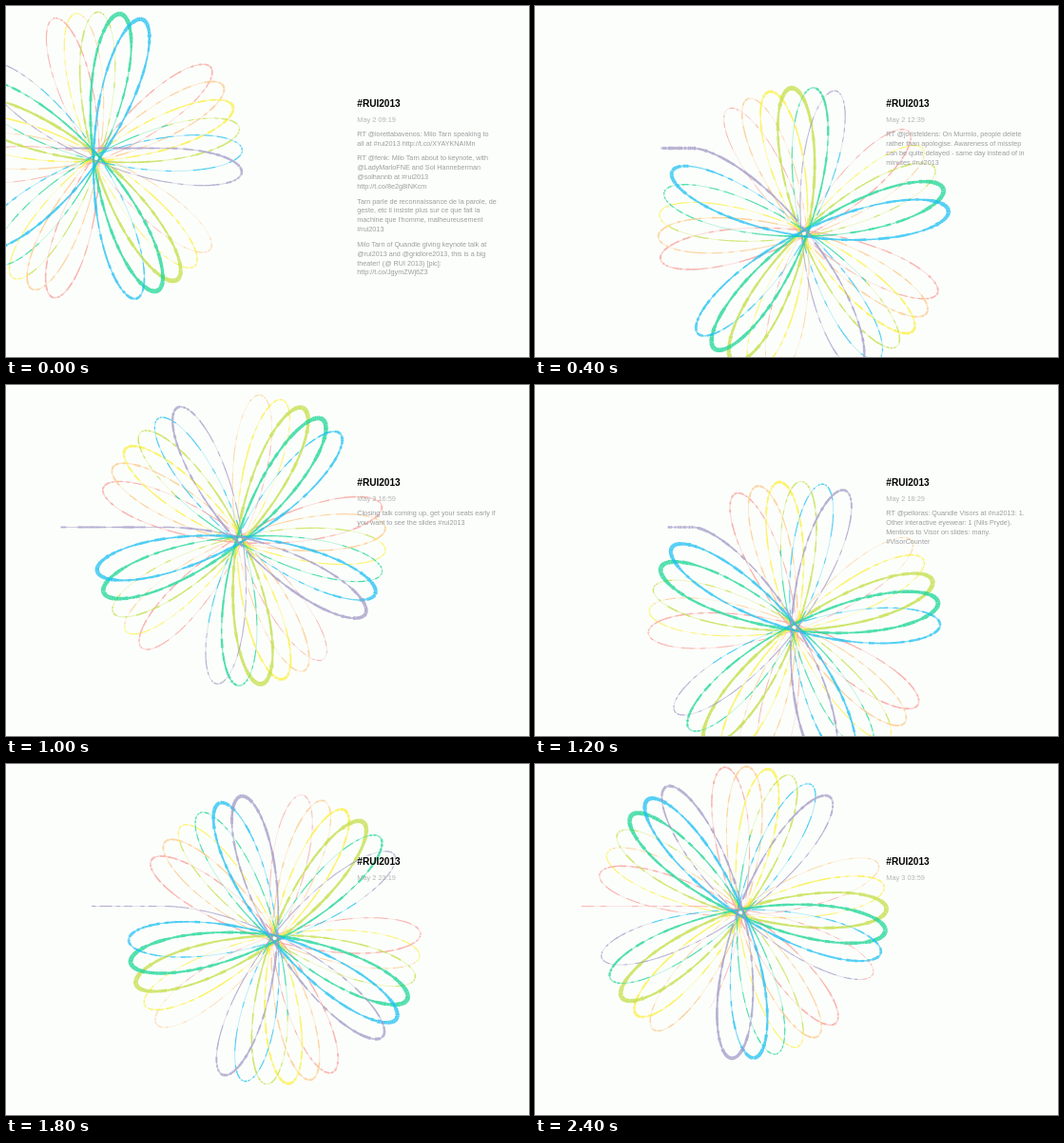
These frames come from a looping animation (550 by 369 pixels, 2600 ms). An HTML page with a canvas:

```html
<!DOCTYPE html>
<html lang="en">
<head>
<meta charset="utf-8">
<title>Tweet rose</title>
<style>
  html, body { margin: 0; width: 100%; height: 100%; overflow: hidden; background: #fcfefb; }
  canvas, svg { position: absolute; left: 0; top: 0; width: 550px; height: 369px; }
  text { font-family: "Liberation Sans", Arial, sans-serif; font-size: 7.22px; fill: #9c9c9f; }
  #title { font-size: 10.08px; font-weight: bold; fill: #000; }
  #date { font-size: 7.4px; fill: #b6b6b6; }
</style>
</head>
<body>
<canvas id="stage"></canvas>
<svg viewBox="0 0 550 369">
  <text id="title" x="369.3" y="105.8">#RUI2013</text>
  <text id="date" x="369.3" y="122.4"></text>
  <g id="tweets"></g>
</svg>
<script>
const W = 550, H = 369, STEP = 200;
const PEN = { x: 165.5, y: 149.5 };
const R = 153.5, HOLE = 3, TURN = 0.1902; // petal length, centre hole, precession
const RATE = 0.5243;                      // degrees of path per minute
const START = { deg: 27.6, minute: 559 }; // path angle and minute of May 2 at the first step
const WEEK = 7 * 1440 * RATE, LEAD = 46, CELL = 5 * RATE;
const OLDEST = START.deg + (START.minute + 6 * 1440) * RATE;

// one colour per weekday, one activity level per day, counted back from May 3
const COLORS = ["#f79d97", "#a298c6", "#1cbff2", "#1ad596", "#c2de45", "#fcee3a", "#fcc787"];
const LEVELS = [0.28, 0.72, 0.88, 1, 0.98, 0.5, 0.32, 0.3];

// pen angle, date and tweets of each step
const STEPS = [
  [27.6, "May 2 09:19", [
    ["RT @lorettabavenos: Milo Tarn speaking to", "all at #rui2013 http://t.co/XYAYKNAIMn"],
    ["RT @fenk: Milo Tarn about to keynote, with", "@LadyMarloFNE and Sol Hanneberman",
     "@solhannb at #rui2013", "http://t.co/8e2g8iNKcm"],
    ["Tarn parle de reconnaissance de la parole, de", "geste, etc il insiste plus sur ce que fait la",
     "machine que l'homme, malheureusement", "#rui2013"],
    ["Milo Tarn of Quandle giving keynote talk at", "@rui2013 and @gridlore2013, this is a big",
     "theater! (@ RUI 2013) [pic]:", "http://t.co/JgymZWj6Z3"]]],
  [-27, "May 2 10:59", [
    ["Full room again this morning, the session on", "everyday sharing is starting now #rui2013"]]],
  [-74.5, "May 2 12:39", [
    ["RT @jorisfeldens: On Murmlo, people delete", "rather than apologise. Awareness of misstep",
     "can be quite delayed - same day instead of in", "minutes #rui2013"]]],
  [-118, "May 2 13:59", [
    ["Lunch is over, on to the afternoon papers and", "the last demos of the week #rui2013"]]],
  [-160.6, "May 2 15:19", [
    ["@IlonaMarrek @TeoBastin Let us know if you", "have any thoughts on our Murmlo regret paper:",
     "http://t.co/zva9hEJdyE #rui2013"]]],
  [-212, "May 2 16:59", [
    ["Closing talk coming up, get your seats early if", "you want to see the slides #rui2013"]]],
  [-257.9, "May 2 18:29", [
    ["RT @pelloras: Quandle Visors at #rui2013: 1.", "Other interactive eyewear: 1 (Nils Pryde).",
     "Mentions to Visor on slides: many.", "#VisorCounter"]]],
  [-306, "May 2 19:59", []],
  [-354.5, "May 2 21:29", []],
  [-412.5, "May 2 23:19", []],
  [-461, "May 3 00:49", [
    ["Back home after a long week, thanks to all", "the volunteers #rui2013"]]],
  [-510, "May 3 02:19", [
    ["Still reading the papers that I missed, many", "good ones this year #rui2013"]]],
  [-559.4, "May 3 03:59", []]
];

const clamp = v => Math.max(0, Math.min(1, v));
const mix = (a, b, t) => a + (b - a) * t;
const noise = n => { const v = Math.sin(n * 12.9898) * 43758.5453; return v - Math.floor(v); };

const canvas = document.getElementById("stage");
const ctx = canvas.getContext("2d");
const ratio = window.devicePixelRatio || 1;
canvas.width = W * ratio;
canvas.height = H * ratio;

function turn(x, y, a) {
  const c = Math.cos(a), s = Math.sin(a);
  return [x * c - y * s, x * s + y * c];
}

const rose = a => turn(R * Math.sin(a), -HOLE * Math.cos(a), TURN * a);

const slope = a => turn((R + TURN * HOLE) * Math.cos(a), (HOLE + TURN * R) * Math.sin(a), TURN * a);

// The path always leaves the pen to the right; newer data waits on a straight line behind it.
function makePath(penDeg) {
  const a0 = penDeg * RAD, z0 = rose(a0), v = slope(a0);
  const stretch = R * Math.abs(Math.cos(a0)), tilt = -Math.atan2(v[1], v[0]);
  return deg => {
    const a = deg * RAD;
    if (a < a0) return [PEN.x + stretch * (a - a0), PEN.y];
    const z = rose(a), p = turn(z[0] - z0[0], z[1] - z0[1], tilt);
    return [PEN.x + p[0], PEN.y + p[1]];
  };
}
const RAD = Math.PI / 180;

const minuteAt = deg => START.minute + (START.deg - deg) / RATE;

function activity(minute, day) {
  const h = (minute - Math.floor(minute / 1440) * 1440) / 60;
  return LEVELS[day] * mix(0.16, 1, clamp((h - 5.5) / 3.5) * clamp((22 - h) / 4.5));
}

function drawRose(penDeg) {
  const at = makePath(penDeg);
  ctx.setTransform(ratio, 0, 0, ratio, 0, 0);
  ctx.fillStyle = "#fcfefb";
  ctx.fillRect(0, 0, W, H);
  const first = Math.floor((penDeg - LEAD) / CELL);
  const last = Math.floor(Math.min(penDeg + WEEK, OLDEST) / CELL) - 1;
  for (let i = last; i >= first; i--) {
    const deg = i * CELL, held = Math.max(deg, penDeg);
    const day = 1 - Math.floor(minuteAt(held) / 1440);
    const act = activity(minuteAt(deg), day);
    const tip = Math.pow(Math.sin(held * RAD), 8);
    const busy = noise(i) < 0.45 + act * (deg < penDeg ? 0.3 : 0.6);
    const bulge = mix(0.35 + 1.1 * noise(i + 7000), 0.95, tip);
    ctx.strokeStyle = COLORS[day];
    ctx.lineWidth = busy ? 0.9 + act * (1.6 + 2.6 * tip) * bulge : 0.5 + act * (0.5 + 2.5 * tip);
    ctx.globalAlpha = busy ? 0.78 : 0.45 + 0.3 * act;
    ctx.beginPath();
    for (let k = 0; k <= 4; k++) ctx.lineTo(...at(deg + CELL * k / 4));
    ctx.stroke();
  }
  ctx.globalAlpha = 1;
}

function drawText(date, tweets) {
  document.getElementById("date").textContent = date;
  const box = document.getElementById("tweets");
  box.replaceChildren();
  let y = 137.2;
  for (const lines of tweets) {
    for (const line of lines) {
      const el = document.createElementNS("http://www.w3.org/2000/svg", "text");
      el.setAttribute("x", 369.3);
      el.setAttribute("y", y);
      el.textContent = line;
      box.append(el);
      y += 9.95;
    }
    y += 5.3;
  }
}

let shown = -1;
function render(now) {
  const index = Math.floor(now % (STEP * STEPS.length) / STEP);
  if (index === shown) return;
  shown = index;
  const [deg, date, tweets] = STEPS[index];
  drawRose(deg);
  drawText(date, tweets);
}

// the oldest day shares the first colour
COLORS.push(COLORS[0]);

const start = performance.now();
function tick() {
  render(performance.now() - start);
  requestAnimationFrame(tick);
}
tick();
</script>
</body>
</html>
```
